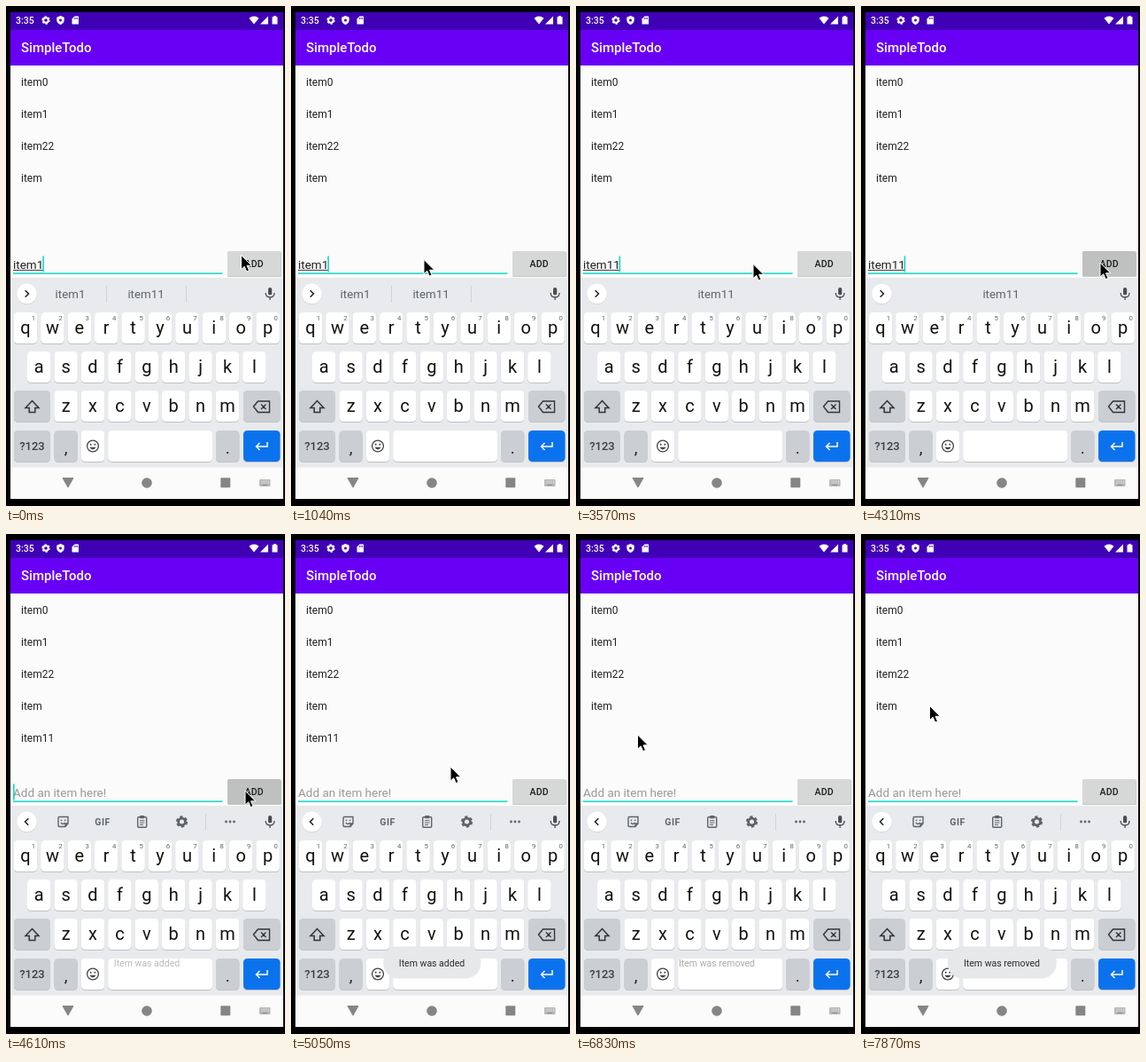
An HTML page for the animation above (8000 ms loop, 315 px wide and 563 px high).

```html
<!DOCTYPE html>
<html lang="en">
<head>
<meta charset="utf-8">
<title>Todo list</title>
<style>
html, body { margin: 0; width: 100%; height: 100%; overflow: hidden; background: #000; }
svg { display: block; width: 315px; height: 563px; font-family: Roboto, "Noto Sans", sans-serif; }
</style>
</head>
<body>
<svg id="stage" viewBox="0 0 315 563" xmlns="http://www.w3.org/2000/svg"></svg>
<script>
const LOOP = 8000;
const INK = '#202124', GREY = '#5f6368', TEAL = '#12d8c8';

const rect = (x, y, w, h, fill, extra = '') =>
  `<rect x="${x}" y="${y}" width="${w}" height="${h}" fill="${fill}" ${extra}/>`;
const circle = (x, y, r, fill, extra = '') =>
  `<circle cx="${x}" cy="${y}" r="${r}" fill="${fill}" ${extra}/>`;
const path = (d, fill, extra = '') => `<path d="${d}" fill="${fill}" ${extra}/>`;
const line = (d, color, width = 1.4) =>
  path(d, 'none', `stroke="${color}" stroke-width="${width}"`);
const text = (x, y, size, str, fill = INK, extra = '') =>
  `<text x="${x}" y="${y}" font-size="${size}" fill="${fill}" ${extra}>${str}</text>`;
const MID = 'text-anchor="middle"';
const MEDIUM = 'font-weight="500"';

const gear = (x, y, r, color) =>
  circle(x, y, r * .6, 'none', `stroke="${color}" stroke-width="${r * .42}"`) +
  circle(x, y, r * .86, 'none', `stroke="${color}" stroke-width="${r * .32}" stroke-dasharray="${r * .5} ${r * .4}"`);

function statusBar() {
  return rect(5, 7, 308, 20, '#3f00b6') +
    text(11, 20, 10.5, '3:35', '#fff', MEDIUM) +
    gear(45, 16, 4.6, '#fff') +
    path('M61.5 11L65.7 12.8V16Q65.5 19.5 61.5 21Q57.5 19.5 57.3 16V12.8Z', '#fff') +
    circle(61.5, 16, 1.5, '#3f00b6') +
    path('M77.5 11.5H82V20.5H74.5V14.5Z', '#fff') +
    line('M77.3 13V15M79 13V15M80.6 13V15', '#3f00b6', .8) +
    path('M274.5 13.7Q280 9.3 285.5 13.7L280 20.5Z', '#fff') +
    path('M287 20.5L296 11.5V20.5Z', '#fff') +
    path('M300.5 12.3H302V11.2H305V12.3H306.5V20.5H300.5Z', '#fff');
}

function key(x, y, w, fill) {
  return rect(x, y + 1, w, 35, '#bfc2c7', 'rx="4.5"') + rect(x, y, w, 35, fill, 'rx="4.5"');
}

function letterRow(letters, firstX, y, digits) {
  return [...letters].map((ch, i) => {
    const cx = firstX + i * 30.4;
    return key(cx - 13.2, y, 26.4, '#fff') +
      text(cx, y + 24, 20, ch, '#111', MID) +
      (digits ? text(cx + 9, y + 9.3, 7.8, (i + 1) % 10, GREY, MID) : '');
  }).join('');
}

function keyboard() {
  const dark = '#cbced3';
  return rect(5, 306, 308, 214, '#e8eaed') +
    letterRow('qwertyuiop', 22, 345, true) +
    letterRow('asdfghjkl', 37.2, 389) +
    letterRow('zxcvbnm', 67.6, 433) +
    key(9, 433, 41, dark) + key(268, 433, 41.5, dark) +
    line('M29.5 444.5L37 452.5H32.8V457.5H26.2V452.5H22Z', '#333', 1.5) +
    line('M279.5 451L284.5 445H297.5V457.5H284.5ZM288 448.5L293.5 454M293.5 448.5L288 454', '#333') +
    key(9, 478, 41, dark) + text(29.5, 500, 13, '?123', '#3a3d41', MID + MEDIUM.padStart(18)) +
    key(54.4, 478, 26.4, dark) + text(67.6, 504, 19, ',', '#222', MID) +
    key(84.8, 478, 26.4, '#fff') +
    circle(98, 495.5, 6.4, 'none', 'stroke="#444" stroke-width="1.3"') +
    circle(95.7, 493.8, 1, '#444') + circle(100.3, 493.8, 1, '#444') +
    path('M94.3 496.8H101.7Q98 502 94.3 496.8Z', '#444') +
    key(115.2, 478, 118, '#fff') +
    key(237, 478, 26.4, dark) + text(250.2, 504, 19, '.', '#222', MID) +
    key(268, 478, 41.5, '#0b72ee') +
    line('M295 491V496H283M286.5 492L282.5 496L286.5 500', '#fff', 1.5);
}

function navBar() {
  const c = '#858585';
  return rect(5, 519.5, 308, 35.5, '#fbfbfb') +
    path('M64 531.5H76L70 542Z', c, `stroke="${c}" stroke-linejoin="round"`) +
    circle(159, 537, 5.8, c) +
    rect(242.3, 531.3, 11, 11, c, 'rx=".8"') +
    rect(286, 533, 12.5, 8, '#b8b8b8', 'rx="1"') +
    line('M287.5 535H297M287.5 537H297', '#fff', .9) +
    line('M287.5 535H297M287.5 537H297', c, '.9" stroke-dasharray="1 .9') +
    line('M289.5 539.2H295', c, .9);
}

function suggestions() {
  return `<g id="words">` +
    text(72.5, 329, 13.3, 'item1', GREY, `id="firstWord" ${MID}`) +
    text(158, 329, 13.3, 'item11', GREY, MID) +
    `<g id="dividers">${line('M113.5 315V334M203.5 315V334', '#d0d2d5', 1)}</g></g>` +
    `<g id="tools">` +
    line('M60.5 318.5H70V326L67 329.5H60.5Q59 329.5 59 328V320Q59 318.5 60.5 318.5ZM70 326H67V329.5M62 325Q64 328 66.5 325', GREY) +
    circle(62.5, 322.3, .9, GREY) + circle(66.7, 322.3, .9, GREY) +
    text(109, 328, 10.5, 'GIF', GREY, `${MID} font-weight="700" letter-spacing=".5"`) +
    rect(148.7, 318.7, 10, 11.5, 'none', `rx="1" stroke="${GREY}" stroke-width="1.4"`) +
    rect(151.2, 317, 5, 3.3, GREY) +
    line('M151 322.7H156.5M151 325H156.5M151 327.3H155', GREY, 1) +
    gear(198.5, 324, 6.5, GREY) +
    line('M225.5 315V334', '#d0d2d5', 1) +
    [248.5, 253, 257.5].map(x => circle(x, 324, 1.4, GREY)).join('') +
    `</g>` +
    circle(23.5, 324.6, 11.4, '#d3d5d8') + circle(23.5, 324, 11.2, '#fff') +
    path('', 'none', `id="chevron" stroke="${INK}" stroke-width="1.5"`) +
    rect(296, 317, 4.2, 8.5, '#4a4d51', 'rx="2.1"') +
    line('M293.2 323Q293.2 328 298.1 328Q303 328 303 323M298.1 328V331', '#4a4d51', 1.3);
}

const stage = document.getElementById('stage');
stage.innerHTML =
  rect(0, 0, 315, 563, '#000') + rect(5, 7, 308, 548, '#fbfbfb') +
  statusBar() +
  rect(5, 27, 308, 40, '#6900f6') + text(17, 52, 15, 'SimpleTodo', '#fff', MEDIUM) +
  ['item0', 'item1', 'item22', 'item'].map((s, i) => text(17, 90 + i * 36, 12, s)).join('') +
  text(17, 234, 12, 'item11', INK, 'id="newItem"') +
  text(8, 295.5, 13.5, '', INK, 'id="field"') +
  rect(8, 297, 34, 1, '#444', 'id="compose"') +
  rect(8, 300.4, 236.5, 1.5, TEAL) +
  rect(0, 281.5, 1.6, 18, TEAL, 'id="caret"') +
  rect(250, 277, 61, 28, '#c5c6c6', 'rx="1.5"') +
  rect(250, 276, 60.5, 28, '#d6d7d7', 'id="button" rx="1.5"') +
  text(280.2, 293.6, 10.5, 'ADD', '#1c1c1c', `${MID} ${MEDIUM} letter-spacing=".3"`) +
  keyboard() + suggestions() + navBar() +
  `<g id="toast">${rect(0, 464.5, 0, 36, '#e7e8ea', 'id="pill" rx="17"')}` +
  text(159, 487, 10.5, '', '#2a2a2a', `id="message" ${MID}`) + `</g>` +
  path('M0 0V16.2L3.7 12.8L6.2 18.6L9 17.4L6.5 11.8H11.8Z', '#000',
    'id="pointer" stroke="#fff" stroke-width="1"');

const el = {};
stage.querySelectorAll('[id]').forEach(n => el[n.id] = n);

const pointerStops = [
  [0, 265.5, 280.5], [150, 270, 284], [290, 271, 285], [740, 258, 285], [890, 195, 285],
  [1040, 150, 285.5], [2240, 152, 286], [2390, 162, 288], [2530, 170, 289.5],
  [2680, 174, 290], [3430, 180, 290], [3570, 200, 290.5], [3720, 240, 290],
  [3870, 269, 289], [4310, 270, 289], [4910, 252, 286], [5050, 180, 262],
  [5200, 105, 233], [5350, 77, 226], [5500, 72, 226], [5640, 69.5, 226],
  [6980, 69.5, 215], [7130, 69.5, 200], [7270, 69.5, 193.5], [7570, 77.5, 193.5]
];
const caretFlips = [290, 740, 1340, 1790, 2240, 2830, 4010, 4310, 5050, 5500, 5790, 6390, 6830, 7420, 7870];
const toastStops = [
  [0, 0, ''], [4610, .32, 'added'], [4760, .8, 'added'], [4910, 1, 'added'],
  [6540, .5, 'added'], [6680, 0, ''], [6830, .4, 'removed'], [6980, .85, 'removed'], [7130, 1, 'removed']
];
const TYPED = 3280, ADDED = 4460, REMOVED = 6390;

const latest = (stops, t) => stops.filter(s => s[0] <= t).pop();
const set = (node, attrs) => {
  for (const name in attrs) node.setAttribute(name, attrs[name]);
};
const show = (node, on) => set(node, { visibility: on ? 'inherit' : 'hidden' });

function render(t) {
  const typed = t >= TYPED, empty = t >= ADDED;
  el.field.textContent = empty ? 'Add an item here!' : typed ? 'item11' : 'item1';
  set(el.field, { fill: empty ? '#999' : INK });
  set(el.compose, { width: typed ? 41 : 34 });
  show(el.compose, !empty);
  set(el.caret, { x: empty ? 8 : typed ? 48.6 : 41.3 });
  show(el.caret, caretFlips.filter(f => f <= t).length % 2 === 0);

  show(el.newItem, empty && t < REMOVED);
  show(el.words, !empty);
  show(el.firstWord, !typed);
  show(el.dividers, !typed);
  show(el.tools, empty);
  set(el.chevron, { d: empty ? 'M25.3 320.2L21.5 324L25.3 327.8' : 'M21.7 320.2L25.5 324L21.7 327.8' });
  set(el.button, { fill: t >= 4310 && t < 4760 ? '#bfc0c0' : t >= 4760 && t < 4910 ? '#cbcccc' : '#d6d7d7' });

  const [, opacity, verb] = latest(toastStops, t);
  const width = verb === 'removed' ? 123 : 110;
  el.message.textContent = verb && `Item was ${verb}`;
  set(el.pill, { x: 159.3 - width / 2, width, opacity: opacity < .5 ? 0 : 1 });
  set(el.toast, { opacity });

  const [, x, y] = latest(pointerStops, t);
  set(el.pointer, { transform: `translate(${x} ${y})` });
}

const start = performance.now();
function tick() {
  render((performance.now() - start) % LOOP);
  requestAnimationFrame(tick);
}
render(0);
requestAnimationFrame(tick);
</script>
</body>
</html>
```
